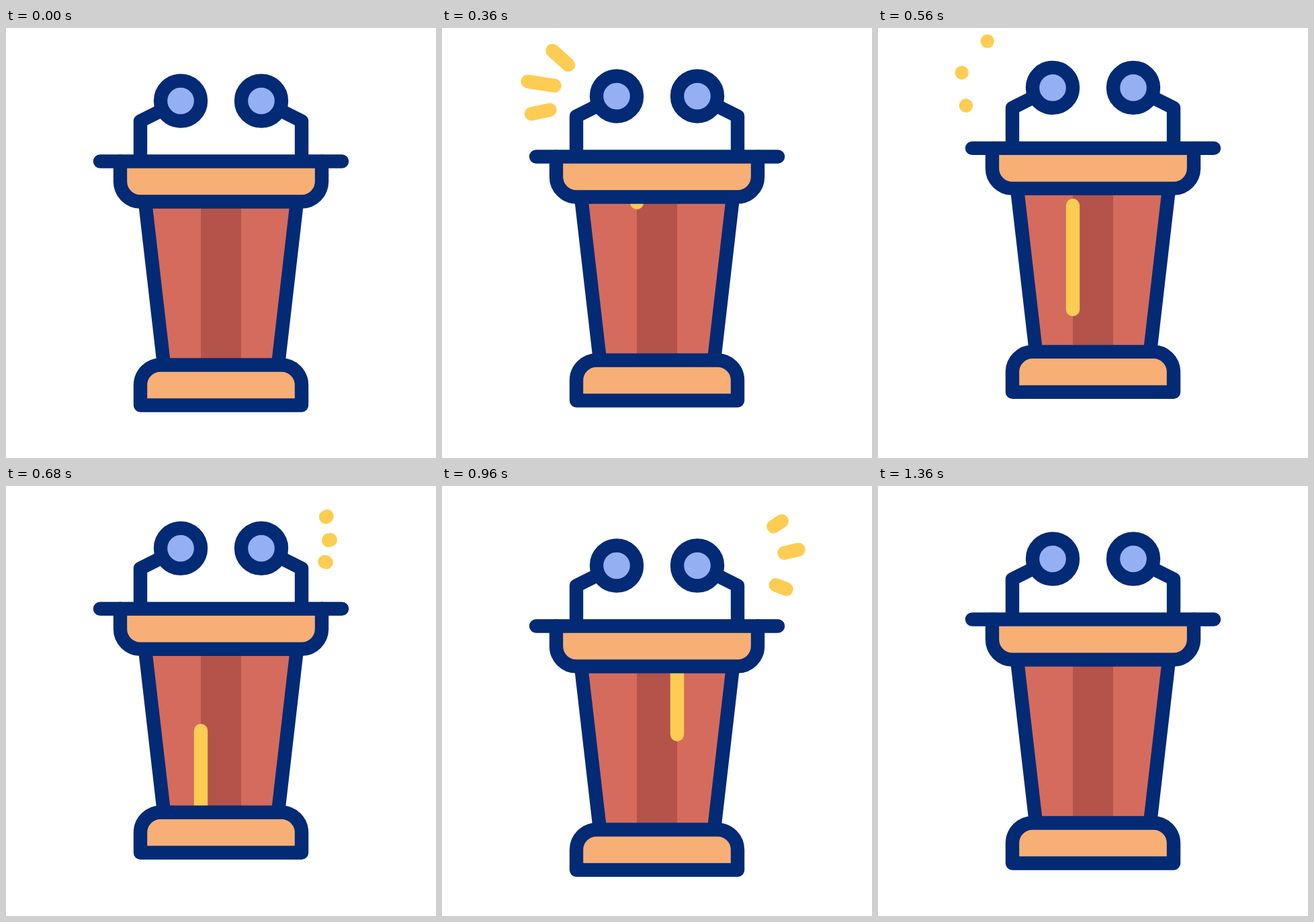
Recreate the animation shown at these times as an HTML page. Size 640x640 px, loop 1.48 s.

```html
<!DOCTYPE html>
<html lang="en">
<head>
<meta charset="utf-8">
<title>Lectern</title>
<style>
  html, body { margin: 0; height: 100%; overflow: hidden; background: #fff; }
  svg { display: block; width: 100vw; height: 100vh; }
  .ink { stroke: #032a75; }
  .wood { fill: #f7af75; }
  #rays { stroke: #fecc52; }
</style>
</head>
<body>
<svg viewBox="0 0 640 640">
  <g id="lectern" fill="none" stroke-width="20.4" stroke-linecap="round" stroke-linejoin="round">
    <path fill="#d56b5d" d="M207 258.5H433L405 501.5H235Z"/>
    <path fill="#b4534a" d="M290 258.5h60v243h-60z"/>
    <g id="rays"></g>
    <g class="ink">
      <path d="M207 258.5L235 501.5M433 258.5L405 501.5"/>
      <path class="wood" d="M170 198.5v30a30 30 0 0 0 30 30h240a30 30 0 0 0 30-30v-30"/>
      <path class="wood" d="M200 561.5v-30a30 30 0 0 1 30-30h180a30 30 0 0 1 30 30v30z"/>
      <path d="M140 198.5H500M200 198.5v-60l32-16M440 198.5v-60l-32-16"/>
      <g fill="#94b0f3">
        <circle cx="260" cy="108.5" r="30"/>
        <circle cx="380" cy="108.5" r="30"/>
      </g>
    </g>
  </g>
</svg>
<script>
const LOOP = 1480, STEP = 40;
const lectern = document.getElementById('lectern');
const rays = document.getElementById('rays');

// Eased progress from time a to time b
const ease = (t, a, b) => {
  const x = Math.min(1, Math.max(0, (t - a) / (b - a)));
  return x * x * (3 - 2 * x);
};

// A ray grows from its first point (head times), then shrinks to its last (tail times)
const ray = (points, head, tail) => {
  const line = document.createElementNS('http://www.w3.org/2000/svg', 'line');
  rays.append(line);
  return { line, points, head, tail };
};
const spark = (delay, ...points) =>
  ray(points, [120 + delay, 400 + delay], [284 + delay, 564 + delay]);
const streak = (delay, x) =>
  ray([x, 258.5, x, 501.5], [320 + delay, 680 + delay], [480 + delay, 880 + delay]);

const allRays = [
  spark(0, 193.5, 67, 162.8, 39.2),
  spark(0, 177, 94.5, 124.7, 86.2),
  spark(0, 167, 127.6, 131, 135.2),
  spark(520, 476, 62, 505.7, 42.2),
  spark(520, 480, 96.6, 530.5, 84.8),
  spark(520, 474.5, 128.6, 512.5, 143.6),
  streak(0, 290),
  streak(480, 350)
];

function draw(t) {
  const y = -20 * ease(t, 205, 592) + 30 * ease(t, 592, 966) - 10 * ease(t, 966, 1286);
  lectern.setAttribute('transform', `translate(0 ${y})`);

  for (const { line, points: [x1, y1, x2, y2], head, tail } of allRays) {
    const end = ease(t, ...head), start = ease(t, ...tail);
    const place = (n, p) => {
      line.setAttribute('x' + n, x1 + (x2 - x1) * p);
      line.setAttribute('y' + n, y1 + (y2 - y1) * p);
    };
    place(1, start);
    place(2, end);
    line.style.display = end > 0 && start < 1 ? '' : 'none';
  }
}

const begin = performance.now();
function tick() {
  const t = (performance.now() - begin) % LOOP;
  draw(Math.floor(t / STEP) * STEP);
  requestAnimationFrame(tick);
}
tick();
</script>
</body>
</html>
```
